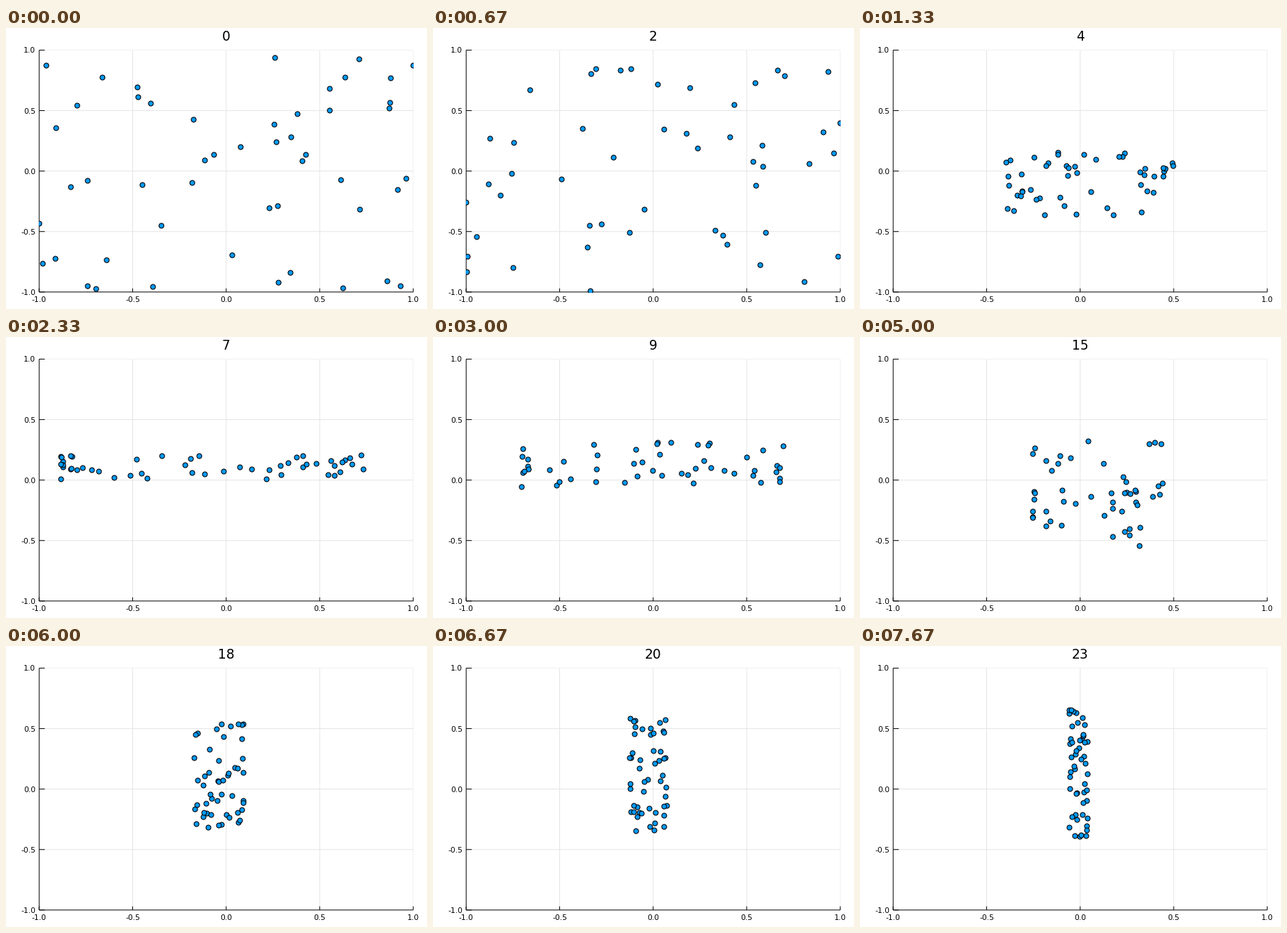
Animation of 600 by 400 pixels, one loop 8 s. Source, as a matplotlib script:

```python
import numpy as np
import matplotlib.pyplot as plt
from matplotlib.animation import FuncAnimation
from matplotlib.patches import Rectangle

W, H, DPI = 600, 400, 100
PX = 72 / DPI                       # one pixel in points
LEFT, RIGHT, TOP, BOTTOM = 47.244, 580.315, 31.496, 375.813
STEPS, COUNT = 24, 50
LOOP, TICK = 8000, 20               # milliseconds

# The cloud's bounds at a few steps; the steps between are interpolated
KEY_STEPS = [0, 3, 4, 5, 6, 7, 11, 15, 18, 23]
X_LOW = [-1, -1, -.395, -1, -1, -.885, -.523, -.256, -.17, -.058]
X_HIGH = [1, 1, .497, 1, 1, .733, .66, .44, .092, .04]
Y_LOW = [-.97, -1, -.363, -.73, -.92, .01, -.12, -.544, -.316, -.39]
Y_HIGH = [.94, .8, .155, .5, .5, .205, .418, .323, .541, .655]


def cloud(step):
    """Random points filling the step's bounds, gathering at both sides."""
    rng = np.random.default_rng(step)
    side = 1 if step == 0 else .55
    unit = np.column_stack([rng.beta(side, side, COUNT), rng.random(COUNT)])
    unit = (unit - unit.min(0)) / np.ptp(unit, axis=0)
    x0, x1, y0, y1 = (np.interp(step, KEY_STEPS, bound)
                      for bound in (X_LOW, X_HIGH, Y_LOW, Y_HIGH))
    return x0 + (x1 - x0) * unit[:, 0], y0 + (y1 - y0) * unit[:, 1]


def px(x):
    return LEFT + (x + 1) / 2 * (RIGHT - LEFT)


def py(y):
    return BOTTOM - (y + 1) / 2 * (BOTTOM - TOP)


plt.rcParams["font.family"] = "DejaVu Sans"
fig = plt.figure(figsize=(W / DPI, H / DPI), dpi=DPI, facecolor="white")
ax = fig.add_axes([0, 0, 1, 1])
ax.set(xlim=(0, W), ylim=(H, 0))
ax.axis("off")


def line(xs, ys, color="black", z=2):
    ax.plot(xs, ys, color=color, lw=PX, zorder=z, snap=False,
            solid_capstyle="butt")


def label(x, y, text, size, align):
    return ax.text(x, y, text, size=size * PX, ha=align, va="baseline")


for v in (-1, -.5, 0, .5, 1):
    x, y = px(v), py(v)
    if v > -1:
        shade = "#f2f2f2" if v == 1 else "#e5e5e5"
        line([x, x], [TOP, BOTTOM], shade, 1)
        line([LEFT, RIGHT], [y, y], shade, 1)
    line([x, x], [BOTTOM, BOTTOM - 5.2])
    line([LEFT, LEFT + 8], [y, y])
    label(x, 390, f"{v:.1f}", 10.7, "center")
    label(42, y + 4, f"{v:.1f}", 10.7, "right")
line([LEFT, LEFT], [TOP, BOTTOM])
line([LEFT, RIGHT], [BOTTOM, BOTTOM])

title = label(px(0), 18, "", 18.7, "center")
dots, = ax.plot([], [], "o", ms=7 * PX, mfc="#009afa", mec="black",
                mew=1.1 * PX, zorder=3, snap=False)
dots.set_clip_path(Rectangle((LEFT, TOP), RIGHT - LEFT, BOTTOM - TOP,
                             transform=ax.transData))
clouds = [cloud(step) for step in range(STEPS)]


def update(frame):
    # Steps begin on the tick nearest to their exact time
    step = int((frame * TICK + 15) * STEPS / LOOP) % STEPS
    x, y = clouds[step]
    dots.set_data(px(x), py(y))
    title.set_text(str(step))
    return dots, title


anim = FuncAnimation(fig, update, frames=LOOP // TICK, interval=TICK,
                     repeat=True, repeat_delay=0)
plt.show()
```
